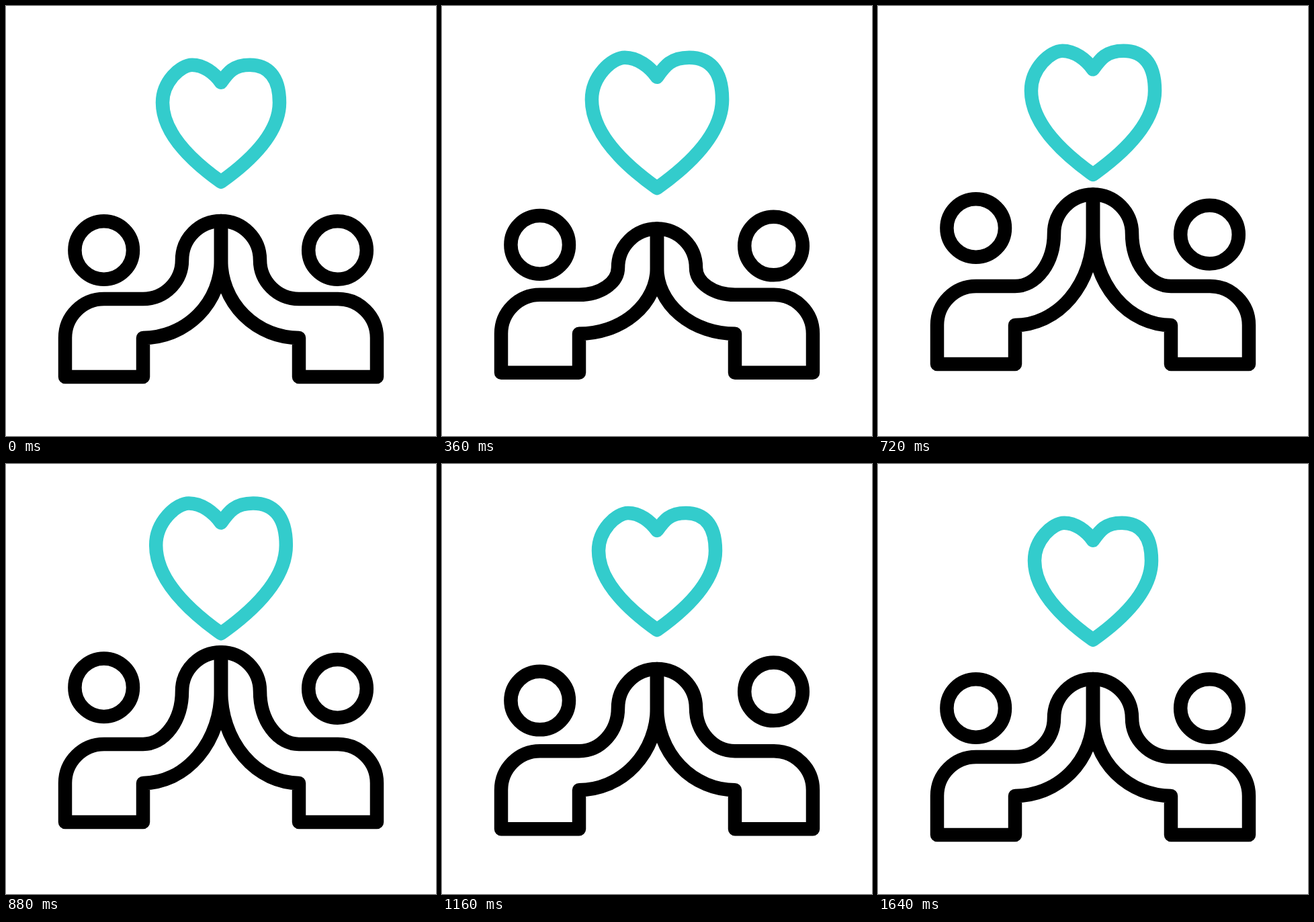
An HTML page for the animation above (1720 ms loop, 640 px wide and 640 px high).

```html
<!DOCTYPE html>
<html lang="en">
<head>
<meta charset="utf-8">
<title>High five</title>
<style>
  html, body { margin: 0; width: 100%; height: 100%; overflow: hidden; background: #fff; }
  svg { display: block; width: 100%; height: 100%; }
  svg * { fill: none; stroke: #000; stroke-width: 20.5; stroke-linecap: round; stroke-linejoin: round; }
  #heart { stroke: #3cc; vector-effect: non-scaling-stroke; }
</style>
</head>
<body>
<svg viewBox="0 0 640 640">
  <path id="heart" d="M0-61C-10-75-26-87-43-87S-87-62-87-31C-87 10-52 50 0 87C52 50 87 10 87-31S68-87 43-87S10-75 0-61Z"/>
  <circle id="headL" cx="145.7" r="43.3"/>
  <circle id="headR" cx="493.5" r="43.3"/>
  <path class="body"/>
  <path class="body" transform="matrix(-1 0 0 1 640 0)"/>
</svg>
<script>
const LOOP = 1720, STEP = 40;
const heart = document.getElementById('heart');
const headL = document.getElementById('headL');
const headR = document.getElementById('headR');
const bodies = document.querySelectorAll('.body');

// Smooth 0 to 1 between times a and b.
function ease(t, a, b) {
  const s = Math.min(1, Math.max(0, (t - a) / (b - a)));
  return s * s * (3 - 2 * s);
}

// Rises from a to b, rests until c, falls back by d.
const swell = (t, a, b, c, d) => ease(t, a, b) - ease(t, c, d);

const beat = (t, peak) => swell(t, peak - 280, peak, peak, peak + 200);

// The torso is lifted by b and the palm by h; elliptic arms bend between them.
function figure(b, h) {
  const r = 58, left = 88, leg = 204, mid = 320;
  const base = 552 - b, low = base - r, top = low - r;
  const tip = 320 - h, wrist = tip + r;
  return `M${left} ${base}V${low}
    A${r} ${r} 0 0 1 ${left + r} ${top}H${leg}
    A${r} ${top - wrist} 0 0 0 ${mid - r} ${wrist}
    A${r} ${r} 0 0 1 ${mid} ${tip}V${wrist}
    A${mid - leg} ${low - wrist} 0 0 1 ${leg} ${low}V${base}Z`;
}

function draw(now) {
  const t = Math.floor(now % LOOP / STEP) * STEP;
  const lift = 19 * swell(t, 130, 730, 880, 1415);
  const dip = 11.5 * swell(t, 40, 360, 360, 760);
  const clap = 41 * swell(t, 360, 760, 822, 1395);
  const d = figure(lift, clap - dip);
  for (const body of bodies) body.setAttribute('d', d);

  headL.setAttribute('cy', 363.5 - 33 * swell(t, 210, 675, 780, 1410));
  headR.setAttribute('cy', 363.5 - 31.5 * swell(t, 80, 1040, 1040, 1440));

  const y = 174.7 - 19.3 * swell(t, 285, 880, 945, 1630);
  const size = 1 + 0.116 * (beat(t, 360) + beat(t, 860));
  heart.setAttribute('transform', `translate(320 ${y}) scale(${size})`);
}

const start = performance.now();
function tick() {
  draw(performance.now() - start);
  requestAnimationFrame(tick);
}
tick();
</script>
</body>
</html>
```
